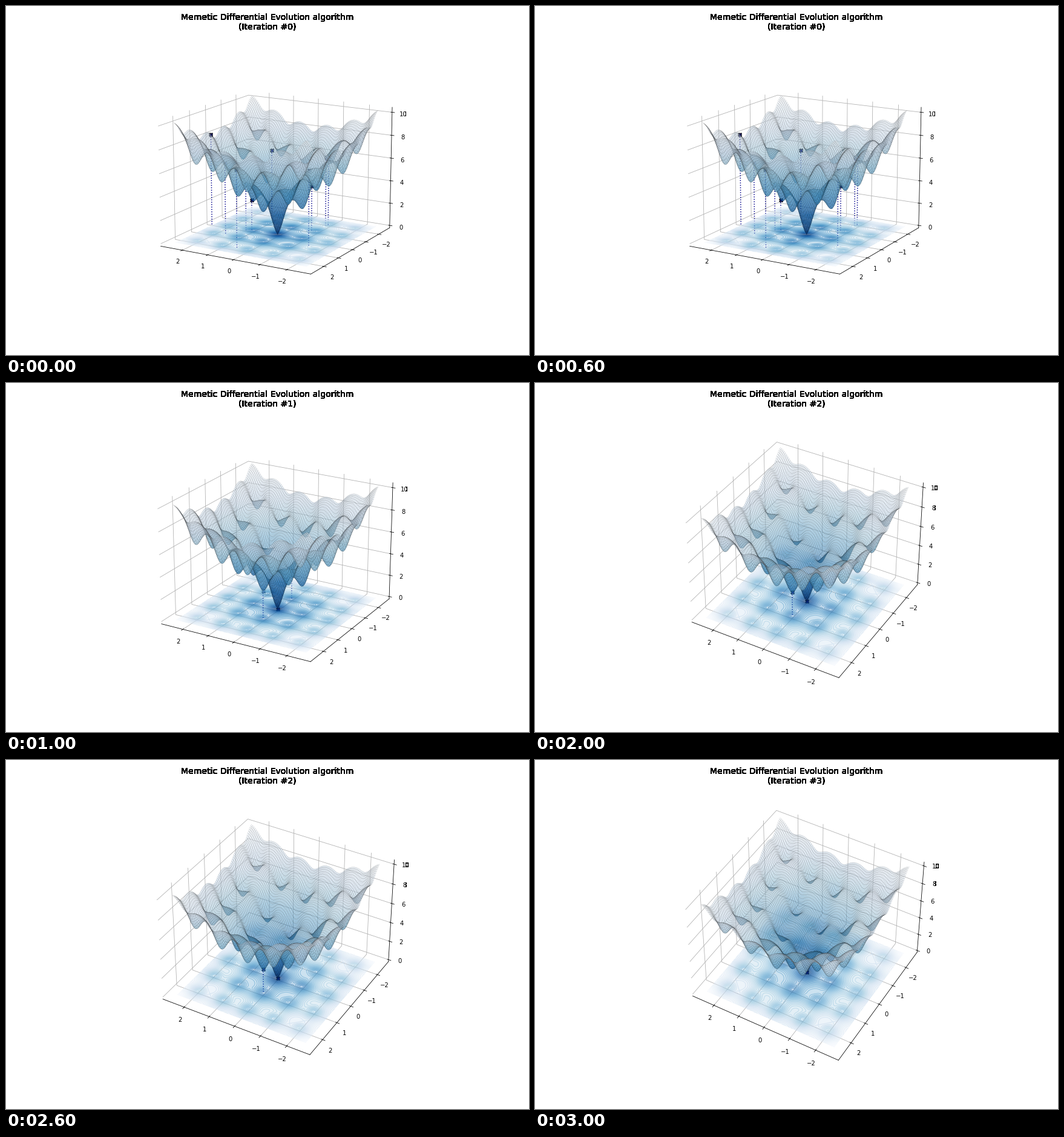
Recreate the animation shown at these times as a matplotlib script. Size 864x576 px, loop 4 s.

```python
import numpy as np
import matplotlib.pyplot as plt
from matplotlib.animation import FuncAnimation
from matplotlib.transforms import Bbox

HALF = 2.5                   # half width of the search domain
EDGE = HALF * 1.1 * 25 / 24  # half width of the axes box
OVERPRINT = 40               # repeated text gives hard, heavy edges

# Population (x, y) at each iteration
POPULATIONS = [
    [(2.5, 0.25), (1.54, 0.89), (0.36, 2.07), (1.19, 0.12), (1.01, 0.03),
     (1.07, -1.45), (-1.54, 0.6), (-0.84, -0.88), (-0.92, -1.75), (-1.01, -1.78)],
    [(0, 0.98), (0, -0.98), (0, 0)],
    [(0, 0.97), (0, 0)],
    [(0, 0)],
]


def ackley(x, y):
    radial = 20 * np.exp(-0.2 * np.sqrt((x * x + y * y) / 2))
    ripple = np.exp((np.cos(2 * np.pi * x) + np.cos(2 * np.pi * y)) / 2)
    return 20 + np.e - radial - ripple


fig = plt.figure(figsize=(12, 8), dpi=72, facecolor="white")
fig.subplots_adjust(bottom=0.125)
ax = fig.add_subplot(projection="3d", computed_zorder=False)

# Landscape and its shadow on the floor
side = np.linspace(-HALF, HALF, 101)
X, Y = np.meshgrid(side, side)
Z = ackley(X, Y)
floor = ax.contourf(X, Y, Z, levels=100, zdir="z", offset=0, cmap="Blues_r",
                    alpha=0.3, antialiased=True, zorder=2)
floor.set_edgecolor("face")
floor.set_linewidth(1)
ax.plot_surface(X, Y, Z, rcount=101, ccount=101, cmap="Blues_r", alpha=0.5,
                edgecolor="black", linewidth=0.125, zorder=3)

# Axes box
top = ackley(HALF, HALF)
ax.set_xlim(-EDGE, EDGE)
ax.set_ylim(-EDGE, EDGE)
ax.set_zlim(-top / 48, top * 49 / 48)
ax.set_xticks(range(-2, 3))
ax.set_yticks(range(-2, 3))
ax.set_zticks(range(0, 11, 2))
for axis in (ax.xaxis, ax.yaxis, ax.zaxis):
    axis.pane.set_visible(False)

# Height labels turn heavy where they leave the axes area
outside = Bbox([[660, 0], [864, 576]])
label_at = -EDGE - 0.291
for height in (8, 10):
    for _ in range(OVERPRINT):
        label = ax.text(label_at, label_at, height, str(height), ha="center",
                        va="top", fontsize=10, clip_on=True, zorder=5)
        label.set_clip_box(outside)

titles = [fig.text(0.5, 0.98, "", ha="center", va="top", fontsize=14)
          for _ in range(OVERPRINT)]


def pin(x, y):
    line, = ax.plot([x, x], [y, y], [ackley(x, y), 0], ":", color="darkblue",
                    lw=1.5, marker="X", ms=6, mec="black", markevery=[0],
                    zorder=1)
    return line


pins = [[pin(x, y) for x, y in population] for population in POPULATIONS]


def update(iteration):
    ax.view_init(elev=30 - 15 * np.cos(iteration), azim=120)
    for title in titles:
        title.set_text("Memetic Differential Evolution algorithm\n"
                       f"(Iteration #{iteration})")
    for i, group in enumerate(pins):
        for line in group:
            line.set_visible(i == iteration)
    return []


anim = FuncAnimation(fig, update, frames=len(POPULATIONS), interval=1000,
                     init_func=lambda: update(0), repeat=True, repeat_delay=0)
plt.show()
```
